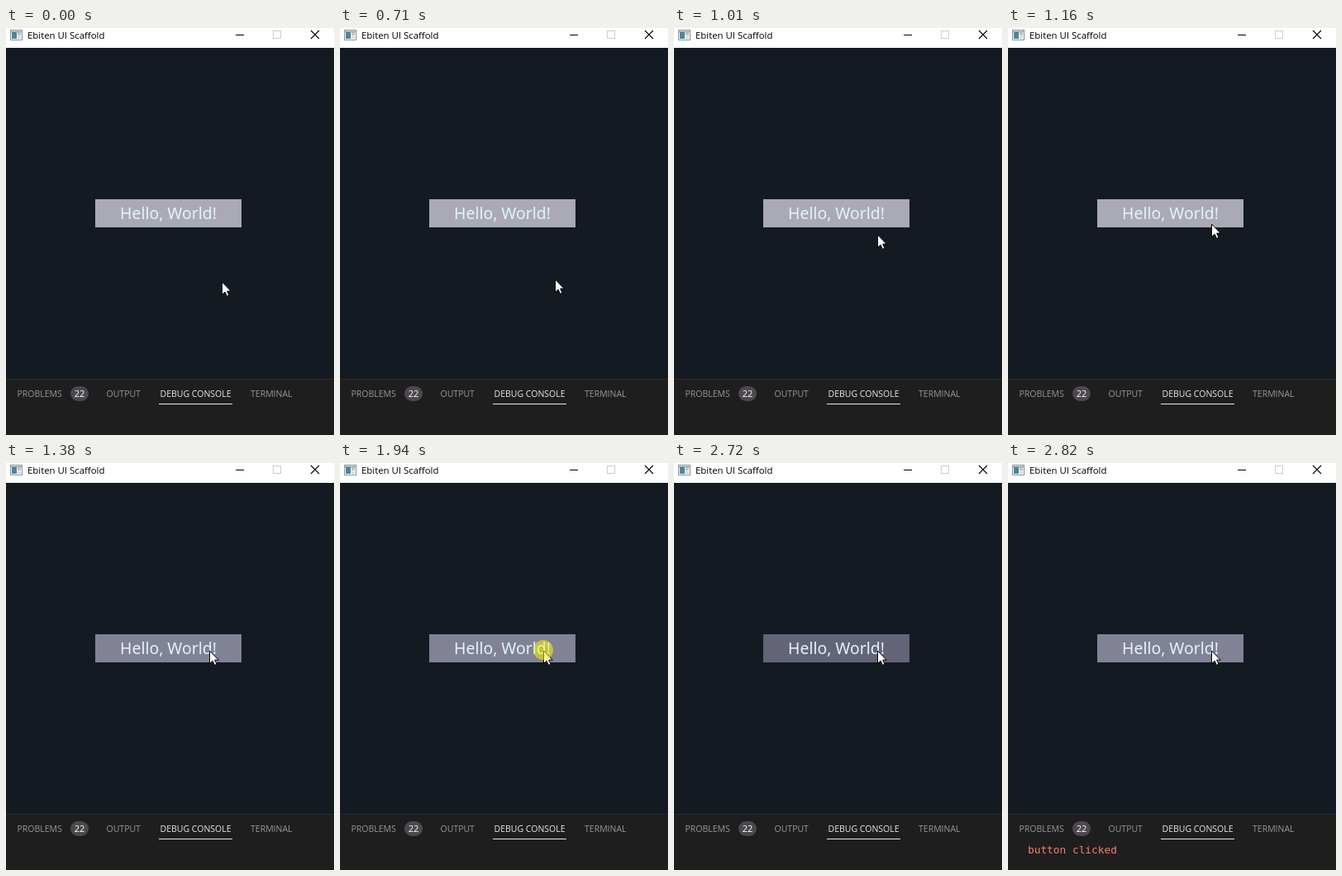
Recreate the animation shown at these times as an HTML page. Size 397 by 492 pixels, loop 4030 ms.

```html
<!DOCTYPE html>
<html lang="en">
<head>
<meta charset="utf-8">
<title>Button demo</title>
<style>
  html, body { margin: 0; width: 100%; height: 100%; overflow: hidden; background: #131a22; }
  svg { display: block; }
  .ui { font-family: "Open Sans", "Noto Sans", sans-serif; }
  .tab { font-size: 10.5px; fill: #9b959f; }
  .label { font: 19.4px "Noto Sans", "Open Sans", sans-serif; fill: #dff4ff; }
  .log { font: 12.8px "DejaVu Sans Mono", monospace; fill: #f97f69; }
</style>
</head>
<body>
<svg width="397" height="492" viewBox="0 0 397 492">
  <rect width="397" height="492" fill="#131a22"/>

  <!-- title bar -->
  <rect width="397" height="24" fill="#fff"/>
  <g shape-rendering="crispEdges">
    <rect x="5" y="2" width="15" height="13" fill="#8b979d"/>
    <rect x="6" y="3" width="13" height="1" fill="#dfe5e8"/>
    <rect x="6" y="5" width="13" height="9" fill="#f3f5f6"/>
    <rect x="7" y="5" width="6" height="8" fill="#4e8795"/>
    <rect x="14" y="5" width="4" height="4" fill="#b9c6cb"/>
    <rect x="14" y="10" width="4" height="3" fill="#d5dde0"/>
    <rect x="278" y="8" width="10" height="1" fill="#000"/>
    <rect x="323.5" y="3.5" width="9" height="9" fill="none" stroke="#ccc"/>
  </g>
  <path d="M369 3l10 10M379 3l-10 10" stroke="#000" stroke-width="1.1"/>
  <text class="ui" x="26" y="13" font-size="11.4">Ebiten UI Scaffold</text>

  <!-- button -->
  <rect id="button" x="108" y="207" width="177" height="34"/>
  <text class="label" x="196.5" y="231" text-anchor="middle">Hello, World!</text>

  <!-- panel -->
  <rect y="424" width="397" height="68" fill="#1e1e1e"/>
  <rect y="424" width="397" height="1" fill="#292b2d"/>
  <g class="ui tab">
    <text x="13.5" y="446">PROBLEMS</text>
    <rect x="78" y="433" width="22" height="18" rx="9" fill="#4d484f"/>
    <text x="89" y="446" text-anchor="middle" fill="#fff" font-size="11">22</text>
    <text x="121.5" y="446">OUTPUT</text>
    <text x="186.5" y="446" fill="#e9e9e9">DEBUG CONSOLE</text>
    <rect x="185" y="454" width="89" height="1" fill="#e7e7e7"/>
    <text x="296" y="446">TERMINAL</text>
  </g>
  <text id="log" class="log" x="24" y="472">button clicked</text>

  <path id="cursor" d="M.5 1V16.6L4.1 13.1L6.5 18.4L9 17.3L6.7 12.1H11.3Z" fill="#fff" stroke="#000"/>
  <circle id="press" cx="246" cy="226" r="12" fill="#ff0" fill-opacity=".5"/>
</svg>
<script>
  const LOOP = 4030, STEP = 30, START = 710;
  const IDLE = "#aaaab4", HOVER = "#828296", DOWN = "#646478";
  // time, x, y of the pointer
  const glide = [[680, 261, 306], [740, 259, 300], [860, 249, 268],
                 [980, 246, 251], [1160, 246, 236], [1220, 246, 234]];
  const settle = [[1250, 231], [1310, 228], [1380, 226]];
  const [button, log, cursor, press] =
    ["button", "log", "cursor", "press"].map(id => document.getElementById(id));

  function pointer(t) {
    if (t < START) return glide[0].slice(1);
    const rest = settle.filter(k => k[0] <= t).pop();
    if (rest) return [246, rest[1]];
    const q = Math.min(1220, START + Math.floor((t - START) / STEP) * STEP);
    const i = glide.findIndex(k => k[0] >= q);
    const a = glide[i - 1], b = glide[i];
    const u = (q - a[0]) / (b[0] - a[0]);
    return [1, 2].map(n => Math.round(a[n] + (b[n] - a[n]) * u));
  }

  function show(el, on) {
    el.setAttribute("visibility", on ? "visible" : "hidden");
  }

  function draw(t) {
    const [x, y] = pointer(t);
    cursor.setAttribute("transform", `translate(${x} ${y})`);
    button.setAttribute("fill", t < 1190 ? IDLE : t >= 1970 && t < 2790 ? DOWN : HOVER);
    show(press, t >= 1940 && t < 2720);
    show(log, t >= 2820);
  }

  const begin = performance.now();
  function tick() {
    draw((performance.now() - begin) % LOOP);
    requestAnimationFrame(tick);
  }
  tick();
</script>
</body>
</html>
```
